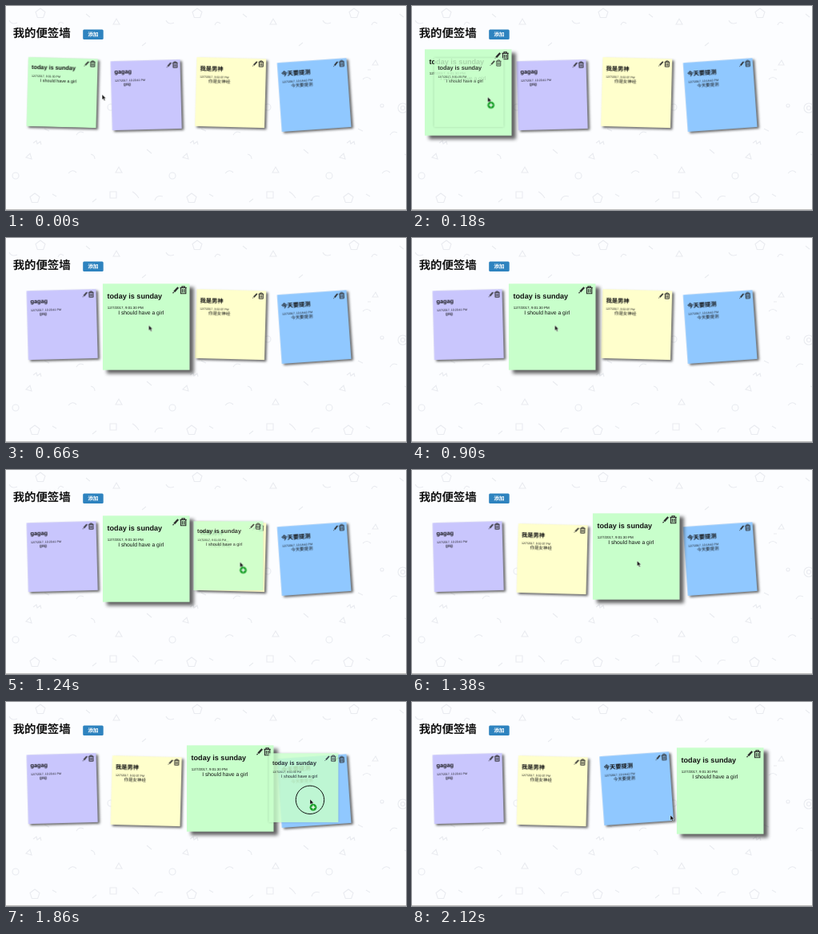
An HTML page that plays this animation: 500 px wide and 256 px high, repeating every 2140 ms.

```html
<!DOCTYPE html>
<html lang="zh-CN">
<head>
<meta charset="utf-8">
<title>我的便签墙</title>
<style>
html, body { margin: 0; width: 100%; height: 100%; overflow: hidden; background: #fcfdff; }
svg { display: block; width: 500px; height: 256px; }
text {
  font-family: "Liberation Sans", "Noto Sans CJK SC", sans-serif;
  fill: #111;
  text-rendering: geometricPrecision;
}
.head { font-size: 14.4px; font-weight: 700; }
.btn { font-size: 6.7px; font-weight: 700; fill: #fff; }
.t { font-size: 7.27px; font-weight: 700; }
.d { font-size: 3.56px; }
.p { font-size: 5.45px; }

.shade { fill: rgba(33, 33, 33, .7); filter: blur(1.5px); transform: translate(2.3px, 2px); }
.slot1 { --from: translate(70.5px, 109px); }
.slot2 { --from: translate(175.5px, 112px); --to: translate(70.5px, 109px); }
.slot3 { --from: translate(281px, 109px); --to: translate(175.5px, 112px); }
.slot4 { --from: translate(385.5px, 112px); --to: translate(281px, 109px); }
.note { transform: var(--from); }

/* one shared loop length */
.note, .lift, .lift .shade, .cursor, .ghost, .drag, .ring {
  animation: 2140ms linear infinite;
}
.slot1 { animation-name: hop; animation-timing-function: step-end; }
.slot2 { animation-name: back2; animation-timing-function: step-end; }
.slot3 { animation-name: back3; animation-timing-function: step-end; }
.slot4 { animation-name: back4; animation-timing-function: step-end; }
.lift { animation-name: lift; }
.lift .shade { animation-name: shade; }
.cursor { animation-name: cursor; }
.ghost {
  animation-name: grip;
  animation-timing-function: step-end;
  opacity: .83;
  filter: drop-shadow(0 0 1.5px rgba(0, 0, 0, .2));
}
.drag { animation-name: drag; animation-timing-function: step-end; }
.ring { animation-name: ring; animation-timing-function: step-end; }

@keyframes hop {
  0% { transform: translate(70.5px, 109px); }
  22% { transform: translate(175.5px, 112px); }
  61.2% { transform: translate(280.5px, 109px); }
  90.2%, 100% { transform: translate(385.5px, 112px); }
}
@keyframes back2 { 0% { transform: var(--from); } 22%, 100% { transform: var(--to); } }
@keyframes back3 { 0% { transform: var(--from); } 61.2%, 100% { transform: var(--to); } }
@keyframes back4 { 0% { transform: var(--from); } 90.2%, 100% { transform: var(--to); } }
@keyframes lift {
  0%, 2% { transform: rotate(1.5deg) scale(1); }
  5%, 100% { transform: rotate(0deg) scale(1.25); }
}
@keyframes shade {
  0%, 2% { transform: translate(2.3px, 2px); }
  5%, 100% { transform: translate(4.2px, 3.6px); }
}
@keyframes cursor {
  0% { transform: translate(120.5px, 111px); }
  3.7%, 8.4% { transform: translate(94px, 114.3px); }
  15.9%, 22% { transform: translate(181px, 107.5px); }
  28%, 42.1% { transform: translate(178.5px, 109.5px); }
  45.8%, 49.5% { transform: translate(190px, 119.5px); }
  57.9%, 61.2% { transform: translate(292.5px, 115.5px); }
  64.4%, 70% { transform: translate(281.5px, 114px); }
  72.9%, 76.6% { transform: translate(289px, 123px); }
  85%, 92.5% { transform: translate(380px, 122px); }
  98.6%, 100% { transform: translate(323px, 142px); }
}
@keyframes grip {
  0% { transform: translate(-23.3px, -5.3px); }
  40% { transform: translate(-14.3px, -7.5px); }
  70%, 100% { transform: translate(-7.8px, -14px); }
}
@keyframes drag {
  0%, 22%, 61.2%, 90.2%, 100% { visibility: hidden; }
  8.4%, 49.5%, 76.6% { visibility: visible; }
}
@keyframes ring {
  0%, 22%, 61.2%, 90.2%, 100% { visibility: hidden; }
  15.9%, 59%, 85% { visibility: visible; }
}
</style>
</head>
<body>
<svg viewBox="0 0 500 256">
  <defs>
    <pattern id="wall" width="196" height="256" patternUnits="userSpaceOnUse">
      <g fill="none" stroke="#e9ebf0" stroke-width="1.1">
        <path id="penta" d="M36 235l6 4.5-2.3 7h-7.4l-2.3-7z"/>
        <use href="#penta" x="7" y="-232"/>
        <path d="M130 233h8v8h-8zM158 233q4 2 8 8M186 244q2-7 10-5M78 210q5-6 10-1"/>
        <path d="M137 209l4-7 4 7zM25 190l5-5 2 7zM134 23l4-7 4 7zM66 74l4-6 3 6z"/>
        <path d="M72 22q-5-4-7 2M4 18q3 6 10 3M58 236l5 3M88 162q3-6 9-3M48 154l6 3M54 92q5-5 10 0M60 80h4M108 246l5-4"/>
        <path d="M34 172l4-3 1 4 4-3 1 4"/>
        <circle cx="12" cy="213" r="4"/>
        <circle cx="131" cy="127" r="4"/>
        <circle cx="104" cy="128" r="6"/>
        <circle cx="104" cy="128" r="2.5"/>
        <circle cx="78" cy="125" r="2"/>
        <path d="M176 180l6 5M106 186q5 1 5 6M170 50l5-4M100 10l5 4"/>
      </g>
    </pattern>

    <rect id="box" x="-43.7" y="-43.7" width="86.9" height="86.6"/>

    <g id="tools" fill="none" stroke="#2b2b2b">
      <path d="M27.8 -35.7L31.8 -40" stroke-width="1.8"/>
      <path d="M27.4 -35.3L26.4 -34.2" stroke-width=".9"/>
      <path d="M33.6 -39.7h6.6M35.6 -39.8v-1.2h2.6v1.2M34.4 -39.4v5.6h5v-5.6M36 -38.4v3.6M37.8 -38.4v3.6" stroke-width=".95"/>
    </g>

    <g id="today">
      <use href="#box" fill="#c8ffcb"/>
      <text class="t" x="-39.2" y="-28.7">today is sunday</text>
      <text class="d" x="-39" y="-18.8">12/7/2017, 9:01:30 PM</text>
      <text class="p" x="-28.3" y="-13.2">I should have a girl</text>
      <use href="#tools"/>
    </g>
  </defs>

  <rect width="500" height="256" fill="#fcfdff"/>
  <rect width="500" height="256" fill="url(#wall)"/>
  <rect y="255" width="500" height="1" fill="#bbb"/>

  <text class="head" x="8.7" y="38.6">我的便签墙</text>
  <rect x="96.2" y="29.5" width="25.5" height="12.5" rx="1.5" fill="#2e83bf"/>
  <text class="btn" x="102.2" y="38.3">添加</text>

  <g class="note slot2"><g transform="rotate(-1.5)">
    <use href="#box" class="shade"/>
    <use href="#box" fill="#c9c6fd"/>
    <text class="t" x="-39.2" y="-28">gagag</text>
    <text class="d" x="-39" y="-18.5">12/7/2017, 10:20:41 PM</text>
    <text class="p" x="-28.3" y="-12.8">gag</text>
    <use href="#tools"/>
  </g></g>

  <g class="note slot3"><g transform="rotate(1.5)">
    <use href="#box" class="shade"/>
    <use href="#box" fill="#ffc"/>
    <text class="t" x="-39.2" y="-27.4">我是男神</text>
    <text class="d" x="-39" y="-18">12/7/2017, 9:02:07 PM</text>
    <text class="p" x="-28.3" y="-11.9">你是女神经</text>
    <use href="#tools"/>
  </g></g>

  <g class="note slot4"><g transform="rotate(-4)">
    <use href="#box" class="shade"/>
    <use href="#box" fill="#90c8ff"/>
    <text class="t" x="-39.2" y="-27.4">今天要提测</text>
    <text class="d" x="-39" y="-18">12/7/2017, 10:18:42 PM</text>
    <text class="p" x="-28.3" y="-11.9">今天要提测</text>
    <use href="#tools"/>
  </g></g>

  <g class="note slot1"><g class="lift">
    <use href="#box" class="shade"/>
    <use href="#today"/>
  </g></g>

  <g class="cursor">
    <g class="drag"><use href="#today" class="ghost"/></g>
    <circle class="ring" r="17.7" cy=".8" fill="none" stroke="#111" stroke-width="1"/>
    <path d="M0 0v6.6l1.5-1.4 1.2 2.6 1.2-.5-1.2-2.5h2z" fill="#111" stroke="#fff" stroke-width=".4"/>
    <g class="drag">
      <circle cx="4" cy="10.2" r="4.4" fill="#1fa32e"/>
      <path d="M1.6 10.2h4.8M4 7.8v4.8" stroke="#fff" stroke-width="1.3"/>
    </g>
  </g>
</svg>
</body>
</html>
```
